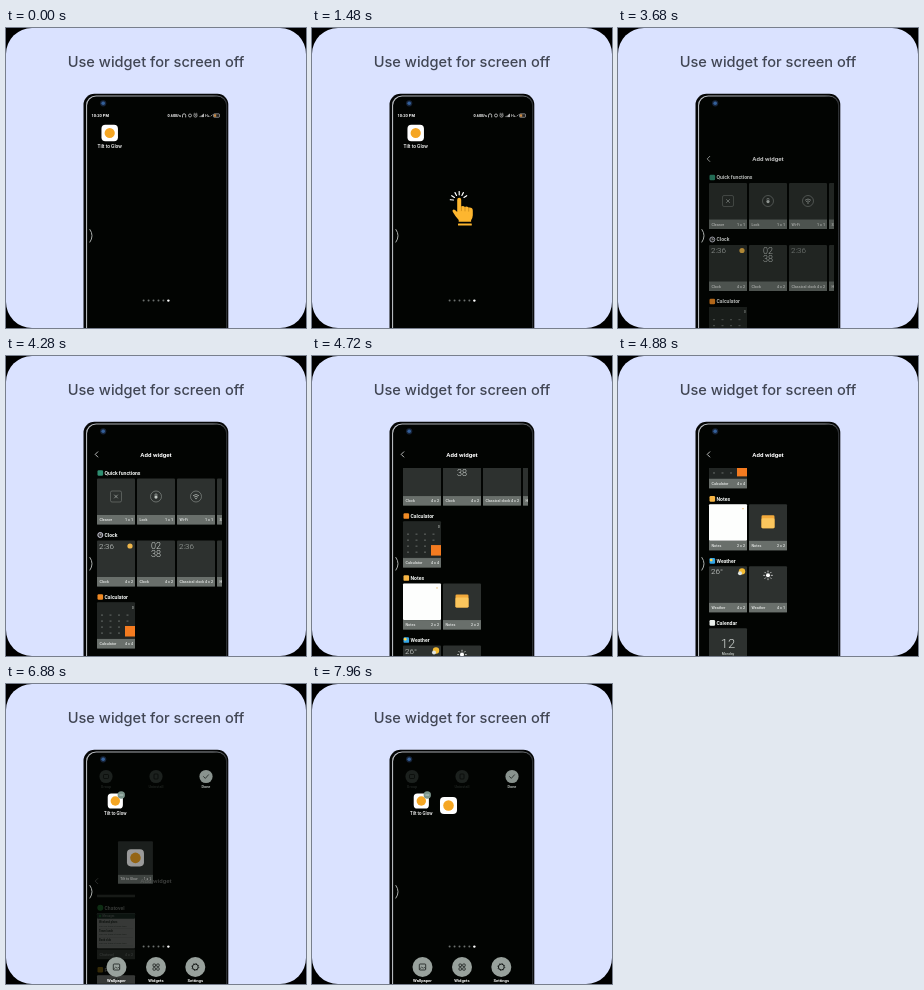
Recreate the animation shown at these times as an HTML page. Size 300x300 px, loop 8 s.

```html
<!DOCTYPE html>
<html lang="en">
<head>
<meta charset="utf-8">
<title>Widget guide</title>
<style>
  html, body { margin: 0; width: 100%; height: 100%; overflow: hidden; background: #000; }
  svg { display: block; width: 100vw; height: 100vh; }
  text { font-family: Roboto, "Noto Sans", sans-serif; }
  .title { font: 500 14.6px Inter, sans-serif; }
</style>
</head>
<body>
<svg id="stage" viewBox="0 0 300 300"></svg>
<script>
const LOOP = 8000, STEP = 62, LIST_TOP = 117;

const rect = (x, y, w, h, fill, r = 0, extra = '') =>
  `<rect x="${x}" y="${y}" width="${w}" height="${h}" rx="${r}" fill="${fill}" ${extra}/>`;
const circle = (x, y, r, fill, extra = '') =>
  `<circle cx="${x}" cy="${y}" r="${r}" fill="${fill}" ${extra}/>`;
const line = (d, color = '#fff', w = 0.8) =>
  `<path d="${d}" fill="none" stroke="${color}" stroke-width="${w}" stroke-linecap="round" stroke-linejoin="round"/>`;
const text = (x, y, size, str, fill = '#fff', anchor = 'start', weight = 500) =>
  `<text x="${x}" y="${y}" font-size="${size}" fill="${fill}" text-anchor="${anchor}" font-weight="${weight}">${str}</text>`;
const group = (id, body, extra = '') => `<g id="${id}" ${extra}>${body}</g>`;

// App tile centred on the origin
const appTile = size =>
  rect(-size / 2, -size / 2, size, size, '#fff', size * 0.24) + circle(0, 0, size * 0.31, '#f5a623');

// Widget list: tile art is drawn in a 38 x 46 box
const white = h => rect(0, 0, 38, h, '#fdfefd', 1);
const outline = (x, y, r) => circle(x, y, r, 'none', 'stroke="#a5aba7" stroke-width=".5"');
const grey = '#c3c9c5';

const closeArt = rect(13.5, 12.5, 11, 11, 'none', 1.5, 'stroke="#858b87" stroke-width=".5"') +
  line('M17.5 16.5l3 3m0-3l-3 3', grey, 0.6);
const lockArt = outline(19, 18, 5.5) + circle(19, 18.6, 1.6, grey) + line('M18 17v-1.5h2V17', grey, 0.5);
const wifiArt = outline(19, 18, 5.5) + line('M16.3 17q2.7-2.3 5.4 0M17.4 18.4q1.6-1.3 3.2 0', grey, 0.7) +
  circle(19, 20, 0.7, grey);
const clockArt = text(2, 8, 8, '2:36', '#d5dad7', 'start', 300) + circle(33, 5.5, 2.6, '#eeb64a');
const stackArt = text(19, 8.5, 9, '02', '#d5dad7', 'middle', 300) + text(19, 16.5, 9, '38', '#d5dad7', 'middle', 300);
const plainClockArt = text(2, 8, 8, '2:36', '#aab0ac', 'start', 300);

const calcArt = rect(0, 0, 38, 36, '#222624', 1) +
  Array.from({ length: 16 }, (_, i) => rect(4 + i % 4 * 8.5, 12 + (i >> 2) * 6, 2, 1.2, '#5b605d')).join('') +
  rect(28, 23.5, 10, 10.5, '#f47b20') + text(35, 6, 3, '0', grey);
const folderArt = rect(12.5, 11, 13, 13, '#f2a93b', 1.3) + rect(12.5, 14, 13, 10, '#fbc65d', 1.3);
const weatherArt = text(2, 8, 8, '26°', '#e2e6e4', 'start', 300) + circle(33, 5, 3.2, '#f3bb32') +
  circle(31, 7, 2, '#dfe4e2');
const sunArt = circle(19, 9, 2, '#fff') +
  Array.from({ length: 8 }, (_, i) => `<g transform="rotate(${i * 45} 19 9)">${line('M19 5.6v-1', '#fff', 0.7)}</g>`).join('');
const calendarArt = text(19, 20, 13, '12', '#d5dad7', 'middle', 300) + text(19, 27, 3.5, 'Monday', grey, 'middle');
const chatArt = white(35) + rect(0, 0, 38, 5.5, '#37504a', 1) + circle(3, 2.8, 1.2, '#35c65a') +
  text(5.5, 3.8, 2.6, 'Messages', '#dce7e2') +
  ['Weekend plans', 'Team lunch', 'Book club'].map((s, i) =>
    text(2, 10 + i * 8.8, 2.7, s, '#3b4440', 'start', 700) +
    text(2, 13.4 + i * 8.8, 2.3, 'See you there at noon then', '#7c8681') +
    rect(2, 15 + i * 8.8, 34, 0.3, '#bcc4c0')).join('');
const adsArt = white(16.5) + text(19, 6, 4, '1.1€', '#4d6a5b', 'middle') + rect(0, 7.8, 38, 0.5, '#8d9591') +
  rect(15, 8, 0.5, 8, '#8d9591') + text(7.5, 13.2, 2.8, '0.4€', '#4d6a5b', 'middle') +
  text(27, 13.2, 2.8, '2.1 today', '#6d9a52', 'middle');
const glowArt = `<g transform="translate(19 17.5)">${appTile(18.5)}</g>`;

const square = fill => rect(91.5, -2.8, 5.6, 5.6, fill, 1.2);
const sections = [
  ['Quick functions', square('#2f8f72'),
    [['Cleaner', '1 x 1', closeArt], ['Lock', '1 x 1', lockArt], ['Wi-Fi', '1 x 1', wifiArt], ['Scan', '', '']]],
  ['Clock', circle(94.3, 0, 2.5, '#333', 'stroke="#dde" stroke-width=".9"') + line('M94.3-1.2V0h1', '#fff', 0.5),
    [['Clock', '4 x 2', clockArt], ['Clock', '4 x 2', stackArt], ['Classical clock', '4 x 2', plainClockArt], ['Hours', '', '']]],
  ['Calculator', square('#f08a24'), [['Calculator', '4 x 4', calcArt]]],
  ['Notes', square('#f6b545'), [['Notes', '2 x 2', white(36.5) + rect(33, 4, 2, 0.8, '#e9b86a')], ['Notes', '2 x 2', folderArt]]],
  ['Weather', square('#35a7e8') + circle(93.2, -0.8, 1.4, '#ffd34d'),
    [['Weather', '4 x 2', weatherArt], ['Weather', '4 x 1', sunArt]]],
  ['Calendar', square('#e9eeeb'), [['Calendar', '2 x 2', calendarArt]]],
  ['Chatovel', circle(94.3, 0, 3, '#3cc755'), [['Chatovel', '4 x 2', chatArt]]],
  ['Promvia', square('#f6b91c'), [['Plumra Prom…', '4 x 2', adsArt]]],
  ['Tilt to Glow', square('#f4f4f4'), [['Tilt to Glow', '1 x 1', glowArt]]]
];

const tile = ([name, size, art]) => rect(0, 0, 38, 46, '#2d312f', 1) + art +
  rect(0, 36.5, 38, 9.5, '#696f6b') +
  text(2.5, 42.6, 3.7, name, '#e8ebe9') + text(36, 42.6, 3.7, size, '#e8ebe9', 'end');
const list = sections.map(([name, icon, tiles], i) =>
  `<g transform="translate(0 ${LIST_TOP + i * STEP})">${icon}${text(98.5, 1.8, 5.1, name, '#f2f5f3', 'start', 600)}` +
  tiles.map((t, n) => `<g transform="translate(${91 + n * 40} 5.5)">${tile(t)}</g>`).join('') + '</g>').join('');

const dots = Array.from({ length: 6 }, (_, i) =>
  circle(137.6 + i * 4.95, 272.6, i == 5 ? 1.2 : 1, i == 5 ? '#fff' : '#6c706e')).join('');

const status = text(85.5, 89, 4, '10:20 PM', '#fff', 'start', 700) + text(161.5, 89, 3.8, '0.60B/s', '#fff', 'start', 700) +
  line('M176.5 89v-1.6a1.6 1.6 0 0 1 3.2 0V89', '#ddd', 0.8) +
  circle(184, 87.5, 1.5, 'none', 'stroke="#ddd" stroke-width=".7"') +
  circle(189.5, 87.6, 1.6, 'none', 'stroke="#ddd" stroke-width=".6"') + line('M187.8 85.8l.8-.6m2.6.6l-.8-.6M189.5 87v.8h.6', '#ddd', 0.5) +
  [0, 1, 2, 3].map(i => rect(193.6 + i * 1.2, 88.2 - i * 0.8, 0.8, 0.9 + i * 0.8, '#ddd')).join('') +
  text(199, 89.2, 3.8, 'H+', '#ddd') + line('M205 88l1.2-1', '#ddd', 0.6) +
  rect(207.5, 85.8, 6, 3.5, '#222', 0.8, 'stroke="#ddd" stroke-width=".5"') + rect(208, 86.3, 2.2, 2.5, '#c98a45');

const topButton = (x, label, on, icon) =>
  circle(x, 92.5, 6.6, on ? '#89938e' : '#1c211e') + icon +
  text(x, 104, 3.8, label, on ? '#cdd4d0' : '#222724', 'middle');
const bottomButton = (x, label, icon) => circle(x, 283, 10, '#98a19c') + icon +
  text(x, 298, 4.2, label, '#fff', 'middle', 600);
const dark = '#161a18';
const bars =
  topButton(100, 'Group', false, rect(97.5, 90.5, 5, 4, 'none', 0.8, 'stroke="#090c0a" stroke-width=".8"')) +
  topButton(150, 'Uninstall', false, rect(148, 90, 4, 5, 'none', 0.8, 'stroke="#090c0a" stroke-width=".8"')) +
  topButton(200, 'Done', true, line('M197.6 92.6l1.7 1.8 3.2-3.6', '#2a302d', 0.9)) +
  bottomButton(110.5, 'Wallpaper', rect(107.3, 280, 6.4, 6, 'none', 0.8, `stroke="${dark}" stroke-width=".8"`) +
    line('M107.8 285l2-2 1.5 1.3 1-1 1.2 1.2', dark, 0.6)) +
  bottomButton(150, 'Widgets', [[147, 280], [150.7, 280], [147, 283.7], [150.7, 283.7]].map(([x, y]) =>
    rect(x, y, 2.5, 2.5, 'none', 0.6, `stroke="${dark}" stroke-width=".8"`)).join('')) +
  bottomButton(189.3, 'Settings', circle(189.3, 283, 2.9, 'none', `stroke="${dark}" stroke-width="1"`) +
    circle(189.3, 283, 3.5, 'none', `stroke="${dark}" stroke-width=".8" stroke-dasharray="1.2 1.55"`));

const rays = [-85, -57, -28, 0, 28, 57].map(a =>
  `<g transform="rotate(${a} 147.2 172.5)">${line('M147.2 166.8v-3.2', '#fff', 1.2)}</g>`).join('');
const hand = '<path fill="#fdb62f" d="M145.2 171.8a2 2 0 0 1 4 0v6.6q2-1.2 3.7.5 2-1 3.6.7 4.3-.6 4.3 3.2v4.4q0 2.4-1.7 5v1.6h-12.4v-1.8q-3.6-3.8-6-8.2-.8-2 1-2.4 1.4-.2 3.5 2.6z"/>' +
  rect(146, 195.4, 13.8, 2, '#fdb62f', 0.5) + line('M149.4 178.5v4.2M153 179.3v3.6M156.7 180.2v3', '#a86f0c', 0.5);

const stage = document.getElementById('stage');
stage.innerHTML = `
  <defs>
    <clipPath id="screen">${rect(82, 70, 135, 230, '#000', 7)}</clipPath>
    <clipPath id="listClip">${rect(88, 112, 128, 300, '#000')}</clipPath>
    <linearGradient id="rim"><stop stop-color="#b4b8bc"/><stop offset=".9" stop-color="#8b9094"/><stop offset="1" stop-color="#2c2f32"/></linearGradient>
  </defs>
  ${rect(0, 0, 300, 300, '#000')}${rect(0, 0, 300, 300, '#dae2ff', 26)}
  <text class="title" x="150" y="39" text-anchor="middle" fill="#414654">Use widget for screen off</text>
  ${rect(77.5, 65.8, 144.8, 270, '#050606', 11)}
  ${rect(80.6, 68, 140, 270, '#000', 9.5, 'stroke="url(#rim)" stroke-width="1.2"')}
  ${rect(81.6, 69, 138.2, 270, '#020402', 8.5)}
  ${circle(97.2, 75.3, 3.1, '#17243a')}${circle(97.2, 75.3, 1.8, '#34609a')}
  <g clip-path="url(#screen)">
    ${group('status', status)}
    ${group('sheet',
      line('M91.8 95.8l-2.6 2.6 2.6 2.6', '#e6e9e7', 0.8) + text(150, 100.6, 6.2, 'Add widget', '#fff', 'middle', 600) +
      `<g clip-path="url(#listClip)">${group('list', list)}</g>`)}
    ${group('home',
      group('app', appTile(16.5) + text(0, 15, 4.8, 'Tilt to Glow', '#fff', 'middle') +
        group('badge', circle(6.5, -6.5, 4, '#7c958b') + line('M4.9-6.5h3.2', '#dfe8e4', 0.7))) +
      group('dots', dots) + group('bars', bars))}
    ${group('drag', group('card', rect(-19, -18, 38, 46, '#2d312f', 1) + rect(-19, 18.5, 38, 9.5, '#696f6b') +
      text(-16.5, 24.6, 3.7, 'Tilt to Glow', '#fff') + text(17, 24.6, 3.7, '1 x 1', '#fff', 'end')) + appTile(18.5))}
    ${group('hand', group('rays', rays) + hand)}
  </g>
  ${line('M83.9 201.5q4.4 6.2 0 12.6', '#a9adab', 1)}`;

const $ = Object.fromEntries([...stage.querySelectorAll('g[id]')].map(g => [g.id, g]));
const clamp = v => Math.min(1, Math.max(0, v));
const ramp = (t, start, length) => clamp((t - start) / length);
const smooth = u => u * u * (3 - 2 * u);
const easeOut = (u, power = 2) => 1 - (1 - u) ** power;
const mix = (a, b, u) => a + (b - a) * u;
const fade = (g, alpha) => g.setAttribute('opacity', alpha);
const place = (g, x, y, scale = 1) => g.setAttribute('transform', `translate(${x} ${y}) scale(${scale})`);

function draw(t) {
  // Long press
  fade($.hand, ramp(t, 100, 700) * (1 - ramp(t, 1760, 180)));
  fade($.rays, ramp(t, 1200, 120));

  // Home screen shrinks into edit mode
  const edit = smooth(ramp(t, 1800, 420));
  fade($.status, 1 - edit);
  place($.app, mix(103.7, 109.3, edit), mix(105, 117, edit), mix(1, 0.92, edit));
  place($.dots, 0, -10 * edit);
  fade($.badge, edit);
  fade($.bars, ramp(t, 2020, 260));

  // Widget sheet slides in, scrolls and leaves
  const shown = easeOut(ramp(t, 3485, 400)) - easeOut(ramp(t, 6646, 434));
  place($.sheet, 0, 125 * (1 - shown));
  fade($.sheet, shown);
  fade($.home, clamp((0.7 - shown) / 0.45));
  place($.list, 0, -364 * easeOut(ramp(t, 4568, 870), 1.3));

  // Picked widget flies to the home screen and settles
  const fly = smooth(ramp(t, 6580, 500));
  const settle = ramp(fly, 0.68, 0.32);
  place($.drag, mix(110, 136.5, fly ** 0.72), mix(271.5, 121.5, fly), mix(1, 0.92, clamp(fly * 2)));
  fade($.drag, t < 6580 ? 0 : mix(0.6, 1, settle));
  fade($.card, 1 - settle);
}

function tick() {
  draw(performance.now() % LOOP);
  requestAnimationFrame(tick);
}
tick();
</script>
</body>
</html>
```
